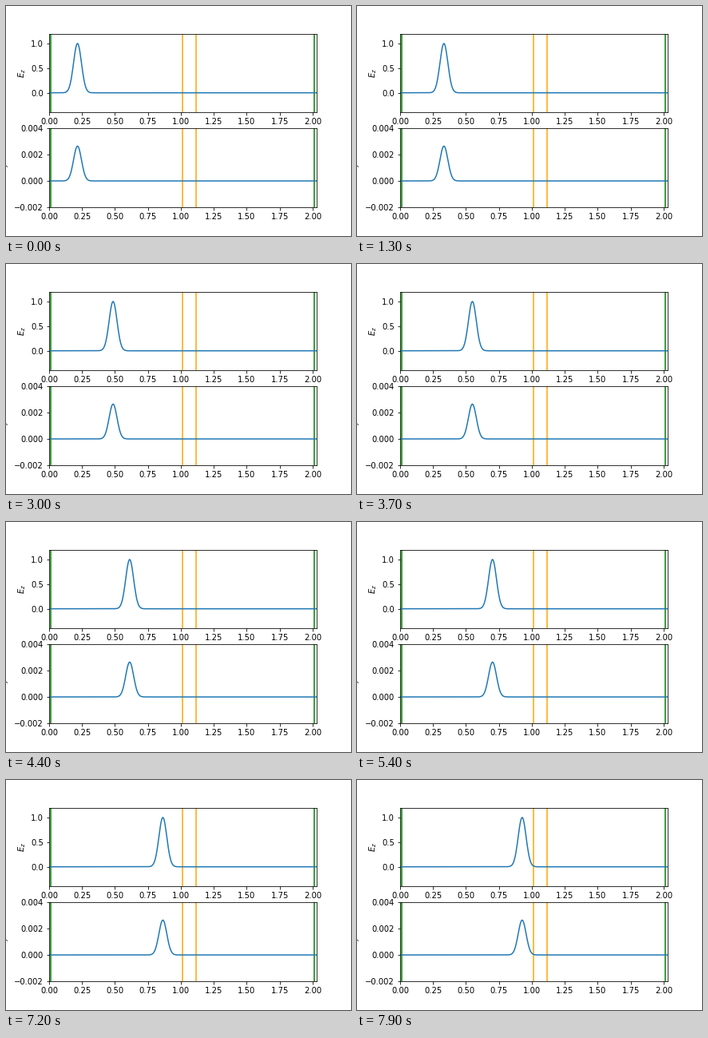
Animation of 432 by 288 pixels, one loop 8000 ms. Source, as a matplotlib script:

```python
import numpy as np
import matplotlib.pyplot as plt
from matplotlib.animation import FuncAnimation

plt.rcParams.update({
    "font.family": "DejaVu Sans",
    "font.size": 10,
    "figure.subplot.bottom": 0.125,
})

FRAMES, INTERVAL = 80, 100
LENGTH, PML = 2.03, 0.015
SLAB = (1.015, 1.115)
START, STEP, SIGMA = 0.2155, 0.009, 0.03
IMPEDANCE = 377.0

x = np.linspace(0, LENGTH, 407)


def pulse(center):
    return np.exp(-0.5 * ((x - center) / SIGMA) ** 2)


def wake(center):
    """Faint residue trailing behind the pulse."""
    return 0.0015 * x / center / (1 + np.exp((x - center) / 0.01))


def panel(ax, label, ylim):
    for pos in (PML, LENGTH - PML):
        ax.axvline(pos, color="green")
    for pos in SLAB:
        ax.axvline(pos, color="orange")
    ax.set(xlim=(0, LENGTH), ylim=ylim, ylabel=label)
    return ax.plot(x, 0 * x, color="C0")[0]


fig, (top, bottom) = plt.subplots(2, 1, figsize=(6, 4), dpi=72)
e_line = panel(top, "$E_z$", (-0.4, 1.2))
h_line = panel(bottom, "$H_y$", (-0.002, 0.004))
top.set_yticks([0, 0.5, 1])
bottom.set_yticks([-0.002, 0, 0.002, 0.004])


def update(i):
    center = START + STEP * i
    field = pulse(center)
    e_line.set_ydata(field + wake(center))
    h_line.set_ydata(field / IMPEDANCE)
    return e_line, h_line


anim = FuncAnimation(fig, update, frames=FRAMES, interval=INTERVAL,
                     repeat=True, repeat_delay=0)
plt.show()
```
